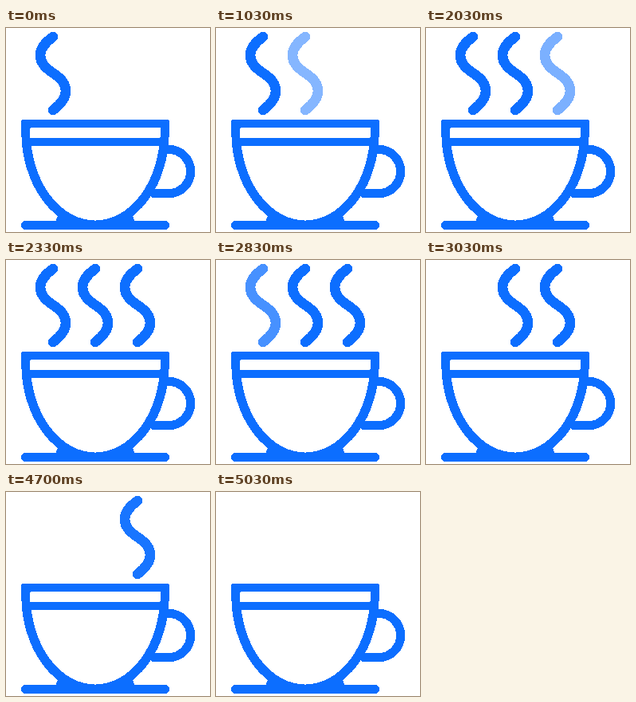
An HTML page for the animation above (6.01 s loop, 256x256 px).

```html
<!DOCTYPE html>
<html lang="en">
<head>
<meta charset="utf-8">
<title>Steaming cup</title>
<style>
  html, body { margin: 0; width: 100%; height: 100%; overflow: hidden; background: #fff; }
  svg { display: block; width: 100vw; height: 100vh; }
</style>
</head>
<body>
<svg viewBox="0 0 256 256" fill="none" stroke="#0c6eff" stroke-linecap="round" stroke-linejoin="round" shape-rendering="crispEdges">
  <defs>
    <path id="wisp" d="M59 11C51 17 43 24 43 34C43 43 48 49 59 56.5C70 64 75 70 75 79C75 89 67 97 59 103"/>
  </defs>
  <g stroke-width="12.6">
    <use class="steam" href="#wisp"/>
    <use class="steam" href="#wisp" x="53"/>
    <use class="steam" href="#wisp" x="106"/>
  </g>
  <g stroke-width="11">
    <path d="M200 152.3H204A27.7 27.7 0 0 1 204 207.7H186"/>
    <path fill="#0c6eff" stroke="none" d="M65 236L62 243H162L159 236Z"/>
    <path fill="#fff" stroke-width="11.5" d="M25 121V130A87 117.3 0 0 0 199 130V121Z"/>
    <path d="M24.5 247.5H199.5"/>
  </g>
  <path fill="#0c6eff" stroke="none" d="M19 118Q19 115 22 115H202Q205 115 205 118L203.5 148H20.5Z"/>
  <rect fill="#fff" stroke="none" x="30" y="125" width="164" height="13" rx="2"/>
</svg>
<script>
  const LOOP = 6010;
  const FADE = 667;
  const CUTOFF = 0.5; // anything fainter is not shown
  const wisps = [...document.querySelectorAll('.steam')];
  // Start of fade-in and fade-out for each wisp, in ms
  const cues = [[-FADE, 2668], [695, 3668], [1670, 4668]];

  const progress = (t, start) => Math.min(1, Math.max(0, (t - start) / FADE));

  function draw(t) {
    cues.forEach(([show, hide], i) => {
      const alpha = progress(t, show) - progress(t, hide);
      wisps[i].setAttribute('opacity', alpha < CUTOFF ? 0 : alpha);
    });
  }

  const origin = performance.now();
  function tick() {
    draw((performance.now() - origin) % LOOP);
    requestAnimationFrame(tick);
  }
  tick();
</script>
</body>
</html>
```
